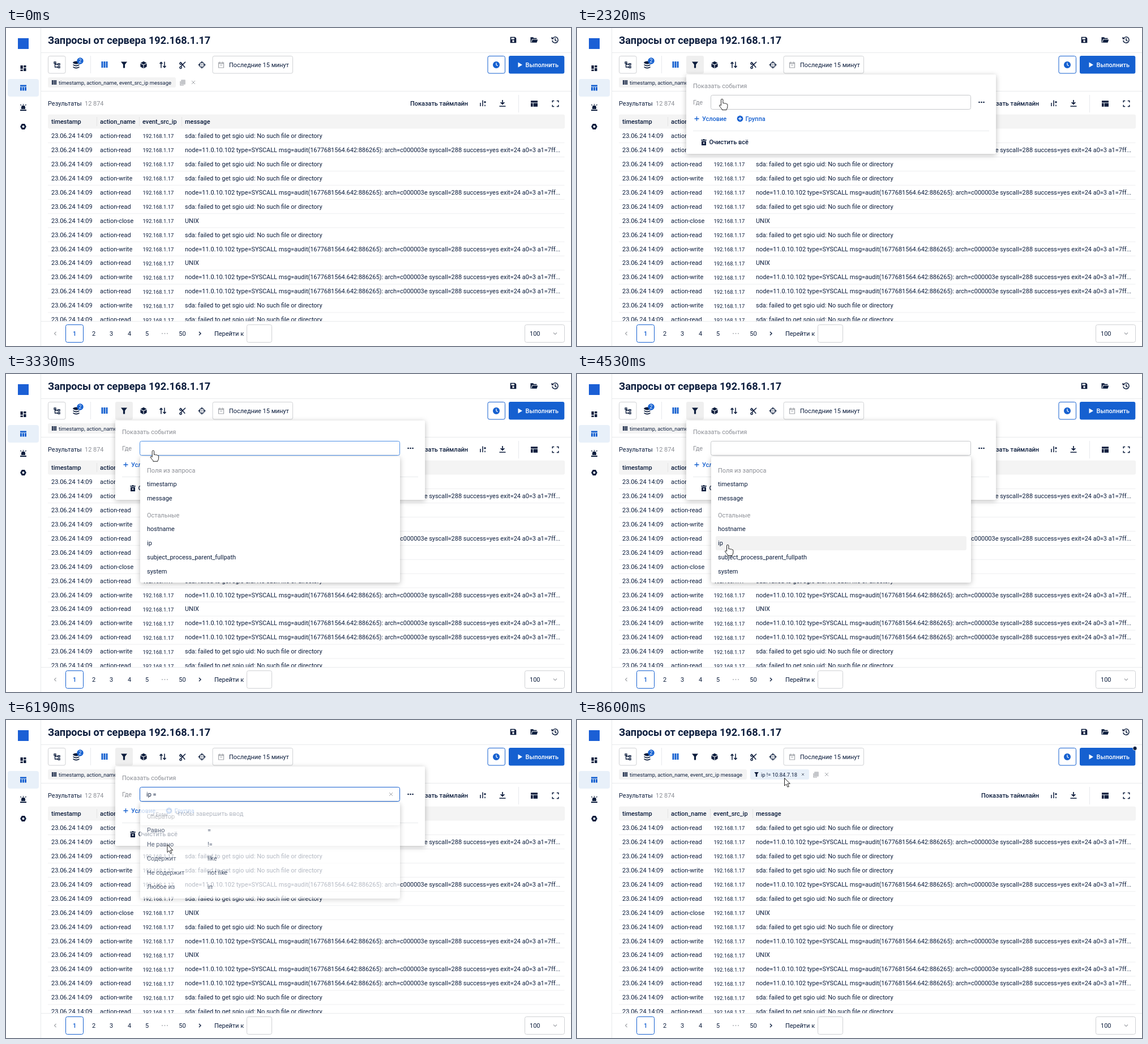
These frames come from a looping animation (998x561 px, 9.59 s). An HTML page:

```html
<!DOCTYPE html>
<html lang="ru">
<head>
<meta charset="utf-8">
<style>
html, body { margin: 0; height: 100%; overflow: hidden; background: #fff; }
svg { display: block; width: 998px; height: 561px; }
text { font: 400 10.95px Roboto, Arial, sans-serif; fill: #0c1d3d; white-space: pre; }
text.s { font-size: 9.4px; }
text.b { font-weight: 500; }
text.h { font-size: 18.1px; font-weight: 600; }
text.g { fill: #8c8f96; }
text.u { fill: #1560d0; }
text.w { fill: #fff; }
text.m { text-anchor: middle; }
.pop { fill: #fff; filter: drop-shadow(0 2px 5px rgba(0,0,0,.26)); }
</style>
</head>
<body>
<svg id="stage" viewBox="0 0 998 561"></svg>
<script>
const LOOP = 9590, INK = '#0c1d3d', BLUE = '#1560d0', SKY = '#4c8fe6', GREY = '#a3a6ab';
const RULE = '#e8eaec', EDGE = '#cfd1d4', FIELD = '#c6c8cb';
const stage = document.getElementById('stage');

// Markup helpers; text is placed by its vertical centre
const text = (x, y, s, cls = '') => `<text x="${x}" y="${y + 3.9}" class="${cls}">${s}</text>`;
const box = (x, y, w, h, fill, r = 0, more = '') =>
  `<rect x="${x}" y="${y}" width="${w}" height="${h}" rx="${r}" fill="${fill}" ${more}/>`;
const frame = (x, y, w, h, color = EDGE, id = '') =>
  box(x + .5, y + .5, w - 1, h - 1, '#fff', 3, `stroke="${color}" ${id}`);
const rule = (x, y, w, color = RULE) => box(x, y, w, 1, color);
const fillIcon = (x, y, d, c = INK) => `<path transform="translate(${x} ${y})" d="${d}" fill="${c}" fill-rule="evenodd"/>`;
const lineIcon = (x, y, d, c = INK, w = 1.5) =>
  `<path transform="translate(${x} ${y})" d="${d}" fill="none" stroke="${c}" stroke-width="${w}"/>`;
const group = (id, body) => `<g id="${id}">${body}</g>`;

// Icon outlines around their own centres
const icon = {
  table: 'M-5.5-5H5.5V-2.3H-5.5ZM-5.5-1.3H-2.5V5H-5.5ZM-1.5-1.3H1.5V5H-1.5ZM2.5-1.3H5.5V5H2.5Z',
  layout: 'M-6-5.2H6V-2H-6ZM-6-1H-2.4V5.2H-6ZM-1.4-1H6V5.2H-1.4Z',
  dash: 'M-5-5H-.7V1H-5ZM.7-5H5V-1.5H.7ZM-5 2.2H-.7V5H-5ZM.7-.3H5V5H.7Z',
  alarm: 'M-3.5 3V0A3.5 3.5 0 0 1 3.5 0V3ZM-5.5 4H5.5V6H-5.5ZM-.6-6H.6V-4.2H-.6ZM-5.5-4.5L-4.6-5.4-3.2-4-4.1-3ZM5.5-4.5L4.6-5.4 3.2-4 4.1-3Z',
  gear: 'M-2.6-5H2.6L5.4 0 2.6 5H-2.6L-5.4 0ZM0-2A2 2 0 1 0 .01-2Z',
  filter: 'M-5.5-5.5H5.5L1.6-.4V5.5H-1.6V-.4Z',
  columns: 'M-5.5-5.5H-2.6V5.5H-5.5ZM-1.5-5.5H1.5V5.5H-1.5ZM2.6-5.5H5.5V5.5H2.6Z',
  cube: 'M0-6.2L5.4-3.3 0-.4-5.4-3.3ZM-5.6-2.2L-.5.6V6.2L-5.6 3.3ZM5.6-2.2L.5.6V6.2L5.6 3.3Z',
  save: 'M-5.3-5.3H3L5.3-3V5.3H-5.3ZM-3.5-3.8V-1H2V-3.8ZM0 .2A1.8 1.8 0 1 0 .01.2Z',
  folder: 'M-6-4.8H-1.5L0-3.3H5V-1.6H-3.4L-5 3.5-3.9 4.8H-6ZM-2.7-.6H6.8L5 4.8H-4.3Z',
  clock: 'M0-6A6 6 0 1 0 .01-6ZM-.6-3.7H.6V-.3L3 1.2 2.4 2.2-.6.4Z',
  trash: 'M-4.8-4.5H-1.7L-1-5.5H1L1.7-4.5H4.8V-3H-4.8ZM-4-2H4V5.5H-4ZM-1.8 0L-.7 1.5-1.8 3H-.7L0 2.2.7 3H1.8L.7 1.5 1.8 0H.7L0 .8-.7 0Z',
  cross: 'M-3-3L3 3M3-3L-3 3',
  copy: 'M-2-4H4V3H-2ZM-4-2V5H2',
  sort: 'M-3 5.5V-4.5M-5.5-2L-3-4.7-.5-2M3-5.5V4.5M.5 2L3 4.7 5.5 2',
  cut: 'M-4-5L4.2 4.8M5-5.2L-2.8 2.4M-2.2-3.6A1.7 1.7 0 1 1-2.3-3.7M-2.2 3.6A1.7 1.7 0 1 1-2.3 3.5',
  target: 'M0-4.4A4.4 4.4 0 1 0 .01-4.4M0-6.5V-2.5M0 6.5V2.5M-6.5 0H-2.5M6.5 0H2.5M-.8 0H.8',
  tree: 'M-5-5H-2V-2.3H-5ZM2-2.4H5V.3H2ZM2 2.6H5V5.3H2ZM-3.5-2.3V4H2M-3.5-1H2',
  calendar: 'M-4.5-4H4.5V5H-4.5ZM-4.5-2.3H4.5M-2.5-5.5V-3M2.5-5.5V-3M-2 .5H2',
  history: 'M-4.6-2.5A5.2 5.2 0 1 1-5.2.8M-5.7-5V-2H-2.7M0-3V.5L2.4 2',
  chart: 'M-4 5V-1M0 5V-5.5M4 5V2.5M2.2-2.2H5.8M4-4V-.4',
  download: 'M0-6V1.2M-3.3-1.8L0 1.4 3.3-1.8M-5.5 5H5.5',
  full: 'M-5.3-2.3V-5H-2.3M2.3-5H5.3V-2.3M5.3 2.3V5H2.3M-2.3 5H-5.3V2.3',
  left: 'M1.5-3L-1.5 0 1.5 3', right: 'M-1.5-3L1.5 0-1.5 3', down: 'M-3-1.5L0 1.5 3-1.5',
  plus: 'M-4 0H4M0-4V4'
};

const tools = x => lineIcon(x, 96, icon.copy, GREY, 1.2) + box(x - 2, 92, 6, 7, '#c4c6ca') + lineIcon(x + 19, 96, icon.cross, GREY, 1);

function sidebar() {
  return box(61, 0, 1, 561, RULE) + box(21, 18, 19, 19, '#1b5fd5') + box(3, 90, 55, 31, '#e8f0f9', 4) +
    fillIcon(30.5, 71, icon.dash) + fillIcon(30.5, 105.5, icon.table, BLUE) +
    fillIcon(30.5, 140, icon.alarm) + fillIcon(30.5, 174, icon.gear);
}

function toolbar() {
  const disks = [-4, 0, 4].map(dy => `<path d="M118.5 ${64 + dy}q5.5 3.4 11 0v1.8q-5.5 3.4-11 0z" fill="${INK}"/>`).join('');
  return text(74, 24.1, 'Запросы от сервера 192.168.1.17', 'h') +
    fillIcon(896, 21, icon.save) + fillIcon(932.5, 21, icon.folder) + lineIcon(970, 21, icon.history) +
    rule(62, 43, 936) + rule(62, 111, 936) +
    frame(74, 49, 31.5, 31.5) + lineIcon(90, 65, icon.tree, INK, 1.3) +
    `<ellipse cx="124" cy="61" rx="5.5" ry="2.4" fill="${INK}"/>` + disks +
    `<circle cx="131" cy="58" r="5.7" fill="${BLUE}"/>` + text(131, 57.4, '2', 's w m') +
    box(149, 49, 1, 31, RULE) + group('pressed', box(193, 49, 31, 31.5, '#efefef', 3)) +
    fillIcon(174, 64.5, icon.columns, BLUE) + fillIcon(208.5, 65, icon.filter) + fillIcon(243, 65, icon.cube) +
    lineIcon(277, 65, icon.sort) + lineIcon(312, 65, icon.cut) + lineIcon(346, 65, icon.target, INK, 1.3) +
    frame(364.5, 49, 142.5, 31.5) + lineIcon(380, 65, icon.calendar, GREY, 1.2) + text(394, 65, 'Последние 15 минут') +
    frame(850.5, 49, 31.5, 31.5, BLUE) + fillIcon(866, 65, icon.clock, BLUE) +
    box(888, 49, 98.3, 31.5, BLUE, 3) + fillIcon(908, 65, 'M-3.5-4.5L4 0-3.5 4.5Z', '#fff') + text(917.5, 65, 'Выполнить', 'b w') +
    box(74, 87, 226, 18, '#f3f3f3', 3) + fillIcon(85, 96, 'M-4-4H-2V4H-4ZM-1-4H1V4H-1ZM2-4H4V4H2Z') +
    text(93, 96, 'timestamp, action_name, event_src_ip message', 's') +
    group('before', tools(312)) +
    group('after', box(306, 87, 104, 18, '#e8f0f9', 3) + fillIcon(317, 96, 'M-3.8-4H3.8L1.2-.3V4H-1.2V-.3Z') +
      text(325, 96, 'ip != 10.84.7.18', 's') + lineIcon(399, 96, 'M-2-2L2 2M2-2L-2 2', '#5d6779', 1) + tools(422) +
      `<circle cx="985.5" cy="50" r="3.6" fill="${INK}" stroke="#fff" stroke-width=".8"/>`);
}

function results() {
  const messages = ['sda: failed to get sgio uid: No such file or directory',
    'node=11.0.10.102 type=SYSCALL msg=audit(1677681564.642:886265): arch=c000003e syscall=288 success=yes exit=24 a0=3 a1=7ff...', 'UNIX'];
  const actions = { r: 'read', w: 'write', c: 'close' };
  const rows = [...'01001020121100'].map((m, i) => {
    const y = 190 + i * 24.95;
    return text(80, y, '23.06.24 14:09') + text(166, y, 'action-' + actions['rrrwrrcrwrwrwr'[i]]) +
      text(241.5, y + .3, '192.168.1.17', 's') + text(316, y, messages[m]) + rule(74, y + 12, 912.5, '#eeeff1');
  }).join('');
  const heads = [[80, 'timestamp'], [166, 'action_name'], [241, 'event_src_ip'], [316, 'message']];
  return text(74, 133.5, 'Результаты') + text(139, 133.5, '12 874', 'g') + text(714, 133.5, 'Показать таймлайн', 'b') +
    lineIcon(842, 133, icon.chart) + lineIcon(877, 133, icon.download, INK, 1.7) + box(905, 118, 1, 31, RULE) +
    fillIcon(933, 133.5, icon.layout) + lineIcon(970.5, 133.5, icon.full) +
    box(74, 152.5, 913, 25, '#f4f4f4', 3) + heads.map(([x, s]) => text(x, 165, s, 'b')).join('') +
    [160, 235, 310].map(x => box(x, 157, 1, 16, '#e4e4e4')).join('') + rows;
}

function pager() {
  const pages = [[155, 2], [186, 3], [218, 4], [249, 5], [311.5, 50]];
  return box(62, 517, 936, 44, '#fff') + rule(62, 517, 936) + lineIcon(87, 539, icon.left, GREY, 1.2) +
    frame(105, 523, 32, 32, BLUE) + text(121, 539, '1', 'b u m') +
    pages.map(([x, n]) => text(x, 539, n, 'm')).join('') +
    [276, 280.5, 285].map(x => `<circle cx="${x}" cy="539" r=".9" fill="${GREY}"/>`).join('') +
    lineIcon(342.5, 539, icon.right, INK, 1.4) + text(368, 539, 'Перейти к') + frame(425, 523, 45, 32) +
    frame(916, 523, 71, 32) + text(925, 539, '100') + lineIcon(970, 539, icon.down, GREY, 1.2);
}

const fields = [[195, 'timestamp'], [220, 'message'], [274, 'hostname'], [299, 'ip'], [324, 'subject_process_parent_fullpath'], [349, 'system']];
const operators = [[195, 'Равно', '='], [220, 'Не равно', '!='], [245, 'Содержит', 'like'], [270, 'Не содержит', 'not like'], [295, 'Любое из', 'in']];
const panel = h => box(237, 146, 459, h, '#fff', 3, 'class="pop"');
const hoverBar = id => box(245, 0, 443, 25, '#f2f2f2', 3, `id="${id}"`);
const items = list => list.map(([y, a, b = '']) => text(249, y - .5, a) + text(356, y - .5, b)).join('');

function popup() {
  return box(193, 82, 547, 140, '#fff', 2, 'class="pop"') + text(205, 102.5, 'Показать события', 'g') +
    text(205, 131.5, 'Где', 'g') + frame(236, 118, 460, 26, FIELD, 'id="field"') +
    `<text id="typed" x="248" y="135.2"></text>` + group('clear', lineIcon(680, 131, icon.cross, GREY, 1)) +
    [710.5, 714.5, 718.5].map(x => `<circle cx="${x}" cy="131" r="1.3" fill="${INK}"/>`).join('') +
    lineIcon(211.5, 160, icon.plus, BLUE, 1.3) + text(221, 160, 'Условие', 'b u') +
    `<circle cx="288" cy="160" r="5.4" fill="${BLUE}"/>` + lineIcon(288, 160, 'M-3 0H3M0-3V3', '#fff', 1.3) + text(297.5, 160, 'Группа', 'b u') +
    rule(205, 181, 523) + fillIcon(224, 201.5, icon.trash) + text(233.5, 201.5, 'Очистить всё', 'b') +
    group('fields', panel(222) + hoverBar('bar1') + text(249, 170, 'Поля из запроса', 'g') + text(249, 249, 'Остальные', 'g') + items(fields)) +
    group('operators', panel(169) + hoverBar('bar2') + text(249, 170, 'Оператор', 'g') + items(operators)) +
    group('hint', panel(39.5) + frame(249, 158, 44.5, 15.5) + lineIcon(258.5, 166.5, 'M2.5-2.5V1H-2M-.4-.8L-2.2 1-.4 2.8', INK, 1) +
      text(264.5, 166, 'Enter', 's') + text(299.5, 165.5, 'Чтобы завершить ввод'));
}

const outline = `fill="#fff" stroke="#222" stroke-width="1" stroke-linejoin="round"`;
stage.innerHTML = sidebar() + toolbar() + results() + pager() + group('menu', popup()) + group('cursor',
  `<path id="arrow" ${outline} d="M0 0V13.5L3.2 10.6 5.6 15.8 7.8 14.8 5.5 9.8H9.8Z"/>` +
  `<path id="hand" ${outline} d="M-2 1.5a1.7 1.7 0 0 1 3.4 0V7.3q1.6-1 3 .4 1.7-.8 2.8.6 2-.4 2.2 1.6V13q0 3-1.7 5v1H-.3V17.6Q-3 15-5 11.6-5 9.3-2 11.2Z"/>`);

const parts = {};
for (const node of stage.querySelectorAll('[id]')) parts[node.id] = node;

const ramp = (t, a, b) => Math.min(1, Math.max(0, (t - a) / (b - a)));
const fade = (id, v) => parts[id].setAttribute('opacity', v);

// Each move: start, end, from where, to where
const moves = [
  [660, 1130, 225, 132, 213, 70], [1930, 2400, 213, 70, 260, 130], [3200, 4460, 260, 130, 266.5, 301.5],
  [4780, 5590, 266.5, 301.5, 285, 220], [7130, 7260, 285, 220, 295, 207], [8330, 8460, 295, 207, 366.5, 102.5]
];
const typing = [[0, ''], [4650, 'ip'], [6190, 'ip ='], [6260, 'ip !='], [6530, 'ip != 1'], [6600, 'ip != 10'], [6670, 'ip != 10.'],
  [6870, 'ip != 10.8'], [6950, 'ip != 10.84.'], [7130, 'ip != 10.84.7'], [7260, 'ip != 10.84.7.'], [7460, 'ip != 10.84.7.1'], [7530, 'ip != 10.84.7.18']];
const latest = (list, t) => list.filter(k => k[0] <= t).pop();

function pointer(t) {
  const [a, b, x0, y0, x1, y1] = latest(moves, t) || moves[0];
  const u = ramp(t, a, b), e = u * u * (3 - 2 * u);
  return [x0 + (x1 - x0) * e, y0 + (y1 - y0) * e];
}

function hover(id, list, y, active) {
  const row = active && list.find(([c]) => Math.abs(y - c) < 12.5);
  fade(id, row ? 1 : 0);
  if (row) parts[id].setAttribute('y', row[0] - 13);
}

function draw(now) {
  const t = now % LOOP, [x, y] = pointer(t);
  const done = ramp(t, 8280, 8460), open = ramp(t, 1280, 1460) - done;
  const swap = ramp(t, 4650, 4800), finish = ramp(t, 6130, 6330);
  fade('menu', open);
  fade('pressed', open);
  fade('before', 1 - done);
  fade('after', done);
  fade('fields', ramp(t, 2650, 2850) - swap);
  fade('operators', swap - finish);
  fade('hint', finish);
  const typed = latest(typing, t)[1];
  const overField = t > 2390 && y < 144;
  parts.field.setAttribute('stroke', typed ? BLUE : overField ? SKY : FIELD);
  parts.typed.textContent = typed;
  fade('clear', typed ? 1 : 0);
  hover('bar1', fields, y, t > 3000);
  hover('bar2', operators, y, t < 6050);
  const hand = t > 1000 && t < 6050;
  fade('cursor', t < 660 ? 0 : 1);
  fade('hand', hand ? 1 : 0);
  fade('arrow', hand ? 0 : 1);
  parts.cursor.setAttribute('transform', `translate(${x.toFixed(2)} ${y.toFixed(2)})`);
}

const start = performance.now();
function tick() {
  draw(performance.now() - start);
  requestAnimationFrame(tick);
}
tick();
</script>
</body>
</html>
```
